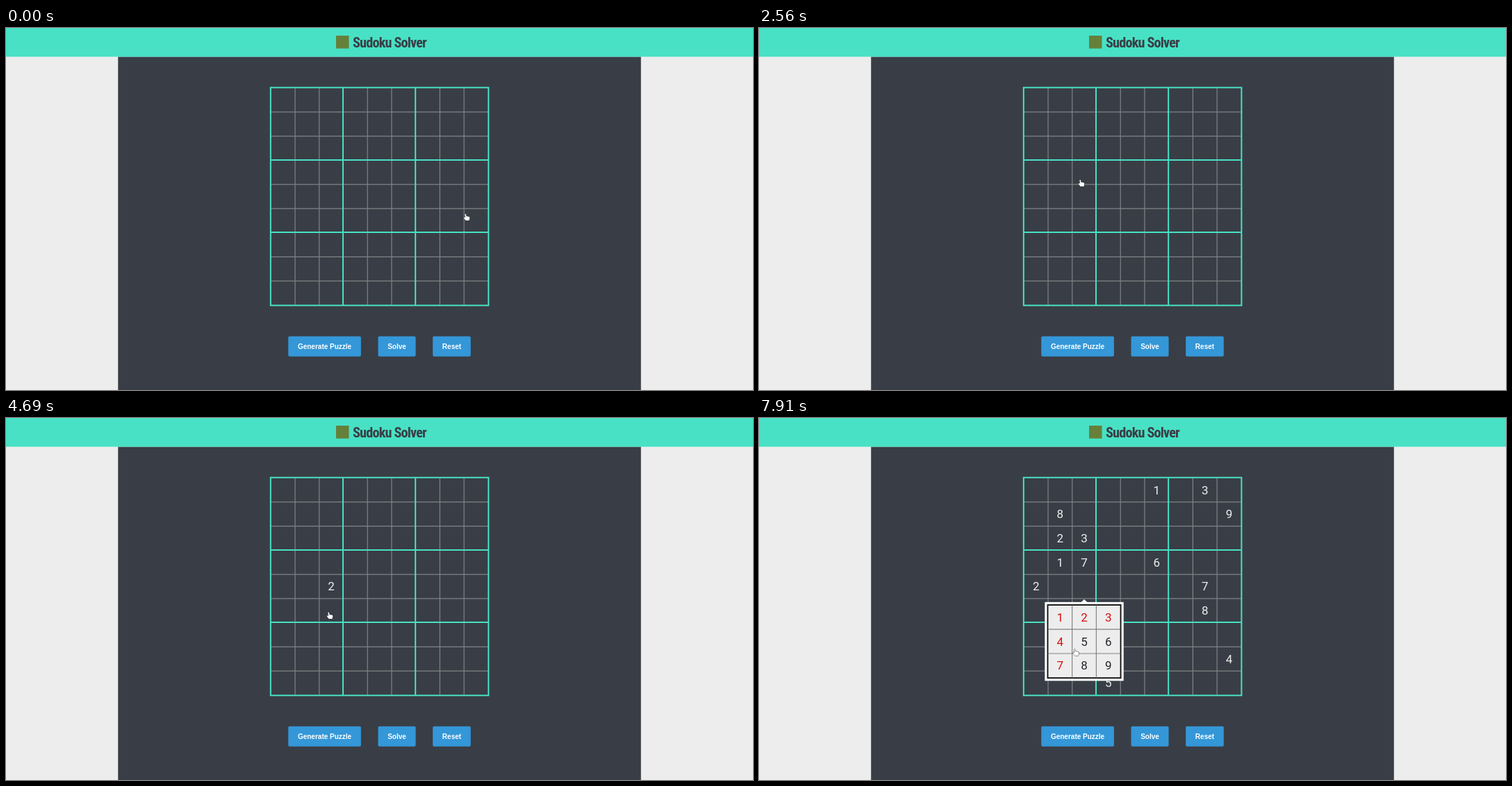
An HTML page with a canvas that plays this animation: 1075x521 px, repeating every 8000 ms.

```html
<!DOCTYPE html>
<html lang="en">
<head>
<meta charset="utf-8">
<title>Sudoku Solver</title>
<style>
  html, body { margin: 0; width: 100%; height: 100%; overflow: hidden; background: #ededed; }
  canvas { display: block; width: 1075px; height: 521px; }
</style>
</head>
<body>
<canvas id="stage"></canvas>
<script>
const W = 1075, H = 521, LOOP = 8000, TICK = 97;
const canvas = document.getElementById("stage");
const ctx = canvas.getContext("2d");
const dpr = window.devicePixelRatio || 1;
canvas.width = W * dpr;
canvas.height = H * dpr;

const DARK = "#393e46", MINT = "#48e1c5", BLUE = "#3497d8", GRAY = "#808386", PAPER = "#ededed";
const HEADER = 41.4;
const GRID = { x: 381.3, y: 86.2, cell: 34.73 };
const GRID_END = { x: GRID.x + 9 * GRID.cell, y: GRID.y + 9 * GRID.cell };
const PICKER = { x: 415.8, y: 269.4, cell: 34.8 };
const PUZZLE = [
  ".....1.3.", ".8......9", ".23......",
  ".17..6...", "2......7.", "..4....8.",
  ".........", "........4", "...5....."
];
const OPENED = 4110, PICKED = 4690, GENERATED = 5950, REOPENED = 7020;

// Each glide runs from one time to another and ends at a point.
const START = { x: 663, y: 272 };
const GLIDES = [
  { from: 110, to: 490, x: 165, y: 4 },
  { from: 1980, to: 2560, x: 464, y: 223 },
  { from: 2660, to: 2660, x: 507, y: 320 },
  { from: 2760, to: 2760, x: 477, y: 384 },
  { from: 2850, to: 2950, x: 442, y: 449 },
  { from: 3140, to: 3720, x: 467, y: 249 },
  { from: 4410, to: 4500, x: 466, y: 284 },
  { from: 4890, to: 5560, x: 458, y: 449 },
  { from: 5750, to: 5750, x: 455, y: 456 },
  { from: 6050, to: 6820, x: 475, y: 244 },
  { from: 7220, to: 7510, x: 471, y: 291 },
  { from: 7810, to: 7910, x: 456, y: 337 }
];

function rect(x, y, w, h, color) {
  ctx.fillStyle = color;
  ctx.fillRect(x, y, w, h);
}

function line(x1, y1, x2, y2, width, color) {
  ctx.beginPath();
  ctx.moveTo(x1, y1);
  ctx.lineTo(x2, y2);
  ctx.lineWidth = width;
  ctx.strokeStyle = color;
  ctx.stroke();
}

function digit(d, board, col, row, color) {
  ctx.font = "17px Roboto, sans-serif";
  ctx.textAlign = "center";
  ctx.fillStyle = color;
  ctx.fillText(d, board.x + (col + 0.5) * board.cell, board.y + (row + 0.5) * board.cell + 6);
}

function pointerAt(t) {
  let { x, y } = START;
  for (const glide of GLIDES) {
    if (t < glide.from) break;
    const gaps = Math.round((glide.to - glide.from) / TICK);
    const gap = gaps ? (glide.to - glide.from) / gaps : TICK;
    const step = Math.min(gaps, Math.floor((t - glide.from + 1) / gap));
    const p = (step + 1) / (gaps + 1);
    x += (glide.x - x) * p;
    y += (glide.y - y) * p;
  }
  return { x, y };
}

// The type size follows from the width the title has to fill.
function drawTitle() {
  const title = "Sudoku Solver", width = 106;
  const setSize = size => {
    ctx.font = `800 ${size}px 'Roboto Condensed', Roboto, sans-serif`;
    ctx.letterSpacing = `${-0.04 * size}px`;
  };
  ctx.save();
  setSize(20);
  setSize(20 * width / ctx.measureText(title).width);
  ctx.textAlign = "left";
  ctx.fillStyle = DARK;
  ctx.fillText(title, 499, 27.5);
  ctx.restore();
}

function layoutButtons() {
  const padding = 13.7, gap = 24.6;
  ctx.font = "bold 10px 'Liberation Sans', Arial, sans-serif";
  const buttons = ["Generate Puzzle", "Solve", "Reset"].map(label =>
    ({ label, y: 443.8, w: ctx.measureText(label).width + 2 * padding, h: 29 }));
  const total = buttons.reduce((sum, b) => sum + b.w + gap, -gap);
  let x = (W - total) / 2;
  for (const b of buttons) {
    b.x = x;
    x += b.w + gap;
  }
  return buttons;
}
const BUTTONS = layoutButtons();

function drawButtons() {
  ctx.font = "bold 10px 'Liberation Sans', Arial, sans-serif";
  ctx.textAlign = "center";
  for (const { label, x, y, w, h } of BUTTONS) {
    ctx.beginPath();
    ctx.roundRect(x, y, w, h, 2);
    ctx.fillStyle = BLUE;
    ctx.fill();
    ctx.fillStyle = "#fff";
    ctx.fillText(label, x + w / 2, y + 18.2);
  }
}

function drawPage() {
  rect(0, 0, W, H, PAPER);
  rect(W * 0.15, HEADER, W * 0.7, H - HEADER, DARK);
  rect(0, 0, W, HEADER, MINT);
  rect(475, 11, 18.5, 18.5, "#66803a");
  drawTitle();
  drawButtons();
}

// Inner lines of a board; every third one is heavy on the large grid.
function drawLines({ x, y, cell }, count, heavy) {
  const size = count * cell;
  for (let i = 1; i < count; i++) {
    if ((i % 3 === 0) !== heavy) continue;
    const d = i * cell - (heavy ? 0.5 : 0);
    const width = heavy ? 2 : 1.2, color = heavy ? MINT : GRAY;
    line(x + d, y, x + d, y + size, width, color);
    line(x, y + d, x + size, y + d, width, color);
  }
}

function drawGrid() {
  drawLines(GRID, 9, false);
  drawLines(GRID, 9, true);
  const grow = 0.5, size = 9 * GRID.cell + 2 * grow;
  ctx.lineWidth = 2;
  ctx.strokeStyle = MINT;
  ctx.strokeRect(GRID.x - grow, GRID.y - grow, size, size);
}

function drawDigits(t) {
  if (t >= GENERATED) {
    PUZZLE.forEach((cells, row) => [...cells].forEach((d, col) => {
      if (d !== ".") digit(d, GRID, col, row, "#eee");
    }));
  } else if (t >= PICKED) {
    digit("2", GRID, 2, 4, "#eee");
  }
}

function drawPicker(used) {
  const { x, y, cell } = PICKER, size = 3 * cell;
  const layer = (pad, color) => rect(x - pad, y - pad, size + 2 * pad, size + 2 * pad, color);
  const mid = x + size / 2, top = y - 8.5;
  ctx.beginPath();
  ctx.moveTo(mid - 5.3, top + 5);
  ctx.lineTo(mid, top);
  ctx.lineTo(mid + 5.3, top + 5);
  ctx.fillStyle = "#fff";
  ctx.fill();
  layer(4.5, "#fff");
  layer(1.3, "#111");
  layer(-0.6, PAPER);
  drawLines(PICKER, 3, false);
  for (let n = 0; n < 9; n++) {
    const color = used.includes(n + 1) ? "#d90f0f" : "#22262c";
    digit(n + 1, PICKER, n % 3, Math.floor(n / 3), color);
  }
}

const HAND = new Path2D(
  "M-2.6-3.9Q-1.8-5.2-1-3.9L-.6-1 3-.6Q4.6-.2 4.3 1.2L3.5 5H-1.4L-4 1.7Q-4.6.2-3.2.2L-2 1.2Z"
);
const ARROW = new Path2D("M-2.3-5.5V4.2L0 2.1 1.6 5.8 3.3 5 1.7 1.5H4.8Z");

function isClickable(x, y) {
  const inGrid = x > GRID.x && x < GRID_END.x && y > GRID.y && y < GRID_END.y;
  return inGrid || BUTTONS.some(b => x > b.x && x < b.x + b.w && y > b.y && y < b.y + b.h);
}

function drawPointer({ x, y }) {
  const hand = isClickable(x, y), shape = hand ? HAND : ARROW;
  ctx.save();
  ctx.translate(x, y);
  ctx.lineJoin = "round";
  ctx.lineWidth = 1;
  ctx.strokeStyle = hand ? "#30343b" : "#fff";
  ctx.fillStyle = hand ? "#fff" : "#111";
  ctx.stroke(shape);
  ctx.fill(shape);
  ctx.restore();
}

function draw(t) {
  ctx.setTransform(dpr, 0, 0, dpr, 0, 0);
  drawPage();
  drawGrid();
  drawDigits(t);
  if (t >= OPENED && t < PICKED) drawPicker([]);
  if (t >= REOPENED) drawPicker([1, 2, 3, 4, 7]);
  drawPointer(pointerAt(t));
}

const begin = performance.now();
function frame() {
  draw((performance.now() - begin) % LOOP);
  requestAnimationFrame(frame);
}
frame();
</script>
</body>
</html>
```
